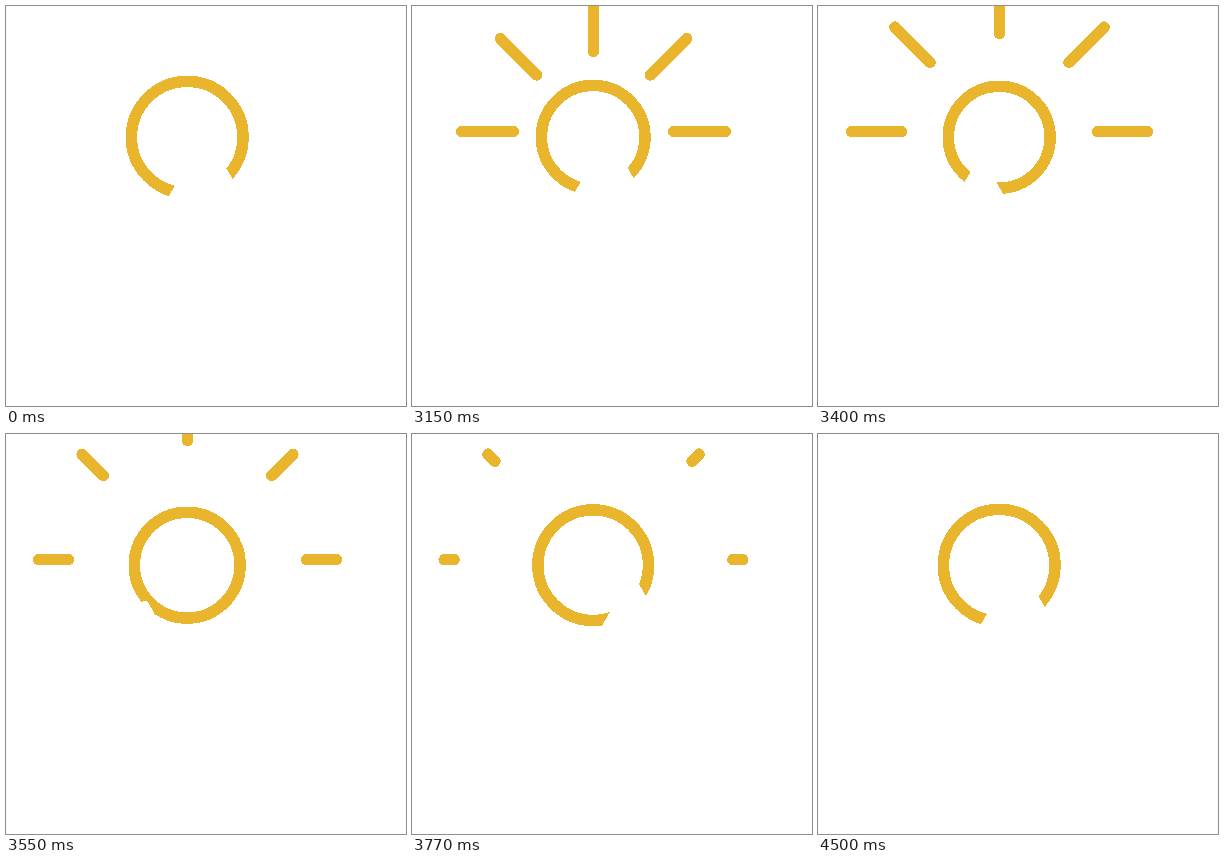
Animation, 400 px wide and 400 px high, one loop 4.52 s. Source, as an HTML page:

```html
<!DOCTYPE html>
<html lang="en">
<head>
<meta charset="utf-8">
<title>Sun</title>
<style>
  html, body { margin: 0; height: 100%; overflow: hidden; background: #fff; }
  svg { display: block; width: 100vw; height: 100vh; shape-rendering: crispEdges; }
  .gold { fill: none; stroke: #e9b52d; stroke-width: 11.5; stroke-linecap: round; }
  .peak { fill: #fff; stroke: #fff; stroke-width: 8; stroke-linejoin: round; }
</style>
</head>
<body>
<svg viewBox="0 0 400 400">
  <circle id="ring" class="gold" cx="181.2" cy="131.2"/>
  <path id="peak" class="peak" d="M0 8L-75 137.9H75Z"/>
  <g id="rays" transform="translate(181.5 125.7)"></g>
</svg>
<script>
const LOOP = 4520, START = 3020, STEP = 25;
const RAY_START = 80.3, RAY_REACH = 69, RAYS_END = 42, PEAK_RETURN = 24;
const ring = document.getElementById('ring');
const peak = document.getElementById('peak');
const rayGroup = document.getElementById('rays');

const rays = Array.from({ length: 5 }, (_, i) => {
  const ray = document.createElementNS('http://www.w3.org/2000/svg', 'line');
  ray.setAttribute('class', 'gold');
  ray.setAttribute('transform', `rotate(${-45 * i})`);
  rayGroup.append(ray);
  return ray;
});

// Rises from 0 towards 1; a power above 1 softens the start.
const ease = (k, from, span, power = 1) =>
  1 - Math.exp(-(Math.max(0, (k - from) / span) ** power));

function draw(t) {
  // The motion advances in steps of 25 ms after a long rest.
  const k = Math.floor((Math.floor(t / 10) * 10 - START) / STEP);
  const resting = k < 0;

  const dip = ease(k, 0, 3.92) * (1 - ease(k, 10, 13.4, 2.2));
  ring.setAttribute('r', 55.8 - 5.6 * dip);

  // The white peak leaves to the lower left and returns from the lower right.
  const slide = k < PEAK_RETURN
    ? -90 * ease(k, 1, 18.9, 2.1)
    : 52 * (1 - ease(k, PEAK_RETURN, 6.6));
  peak.setAttribute('transform',
    `translate(${199.6 + slide} ${126.3 + 0.6 * Math.abs(slide)})`);

  const tip = RAY_START + RAY_REACH * ease(k, -0.36, 3.92);
  const tail = RAY_START + RAY_REACH * ease(k, 8.2, 14.4, 1.6);
  rayGroup.style.display = resting || k >= RAYS_END ? 'none' : '';
  for (const ray of rays) {
    ray.setAttribute('x1', tail);
    ray.setAttribute('x2', tip);
  }
}

const begin = performance.now();
function tick() {
  draw((performance.now() - begin) % LOOP);
  requestAnimationFrame(tick);
}
tick();
</script>
</body>
</html>
```
